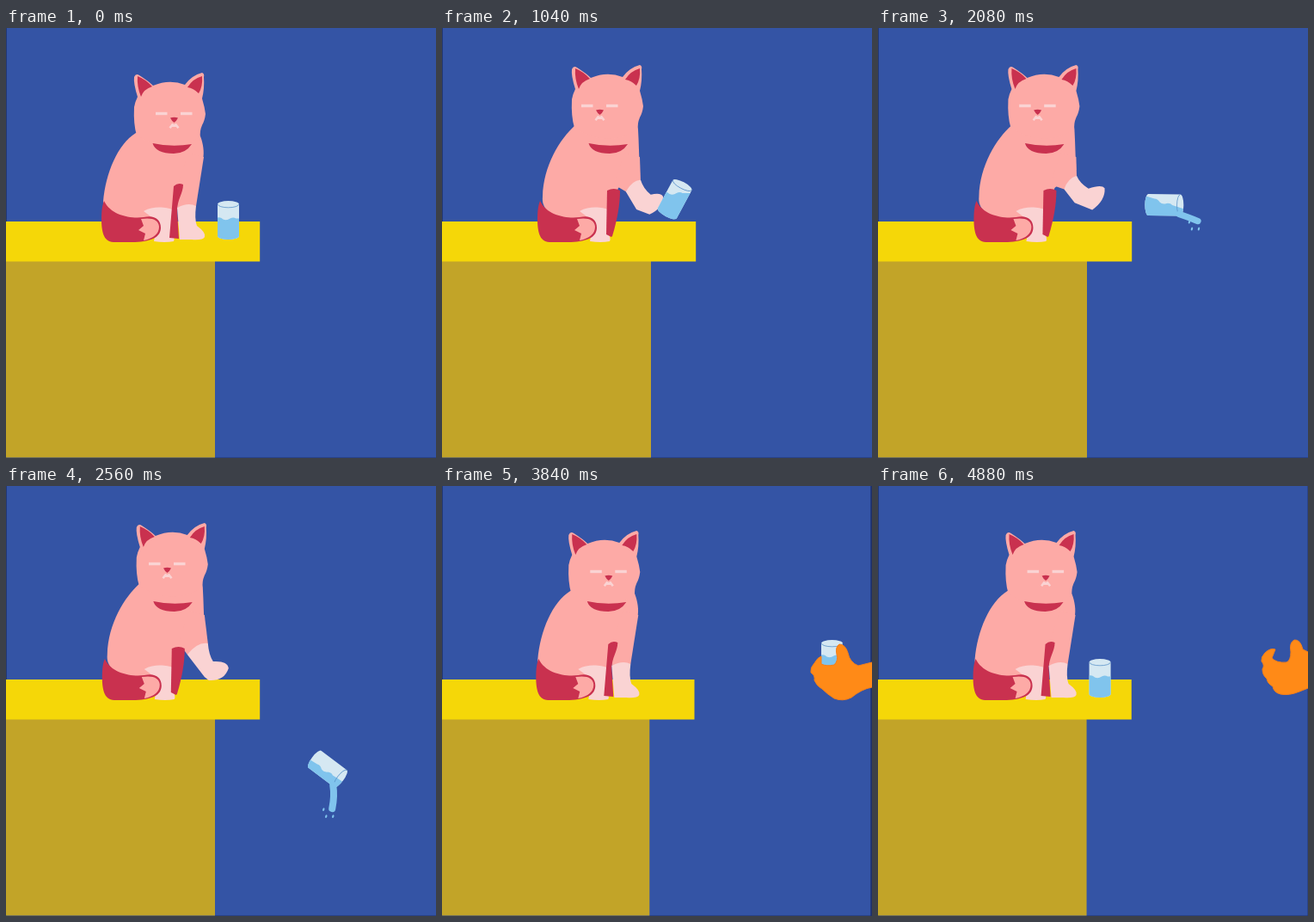
An HTML page with a canvas for the animation above (5040 ms loop, 500 px wide and 500 px high).

```html
<!DOCTYPE html>
<html lang="en">
<head>
<meta charset="utf-8">
<title>Cat and glass</title>
<style>
  html, body { margin: 0; width: 100%; height: 100%; overflow: hidden; background: #1f3068; }
  canvas { display: block; width: 100vw; height: 100vh; }
</style>
</head>
<body>
<canvas id="stage" width="500" height="500"></canvas>
<script>
const ctx = document.getElementById('stage').getContext('2d');
const LOOP = 5040;

// Every bar the picture is held between these moments.
const BAR = 1040;
const BEATS = [0, 80, 240, 480, 640, 720, 880];

const C = {
  dark: '#1f3068', wall: '#3454a5', top: '#f5d708', side: '#c2a428',
  fur: '#fdaaa6', red: '#c9314f', pale: '#fad3d3',
  glass: '#d5e8f2', water: '#80c4ed', rim: '#5b93c9',
  hand: '#ff8a17', handEdge: '#f57f1a'
};

const BODY = [
  'M151 122 C130 135 116 168 113 202 C112 225 160 225 190 225 L205 182 L229 152 C231 145 229 133 226 126Z',
  'M155 113 C137 129 118 160 117 196 C114 225 160 225 191 225 L205 186 L230 165 C229 150 229 135 228 118Z'
];
const INNER_LEG = [
  'M195 184 Q200 179 206 182 C206 192 199 200 199 212 L201 245 L190 244Z',
  'M192 189 Q200 185 207 189 C207 205 204 222 198 242 L197 243 L191 240Z'
];
const HEAD = 'M152 125 Q148 112 149 92 Q150 86 153 80 Q148 64 149 57 Q151 52 155 55 Q166 62 171 67' +
  'Q190 59 208 66 Q216 55 228 52 Q231 53 230 57 Q231 70 228 82 Q231 92 232 100 Q231 108 228 113' +
  'Q225 120 226 127 Q190 150 152 125Z';
const EARS = 'M153 56 Q163 60 170 68 Q160 71 157 80 Q152 68 153 56Z' +
  'M228 56 Q229 68 224 76 Q218 70 211 69 Q217 59 228 56Z';
const COLLAR = 'M170.500 134 Q193 139 216 135 Q209 146 195 146 Q174 146 170.500 134Z';
const HIND = 'M160 213 C172 206 188 209 193 211 L192 238 Q197 243 195 248 Q185 250 172 248 L176 225Z';
const TAIL = 'M114 201 C122 218 145 222 160 220 C172 217 180 222 180 232 C180 243 170 248 150 249' +
  'L125 249 C113 249 111 235 111 222 C111 212 112 206 114 201Z';
const TAIL_TIP = 'M157 222 L160 230 L154 235 L162 239 L160 247 Q178 243 178 231 Q177 219 157 222Z';

const PAW = {
  rest: 'M199 209 Q212 202 221 207 Q219 222 222 230 Q233 238 231 243 Q229 247 216 246 L202 246Z',
  touch: 'M210 195 Q222 181 232 184 Q234 197 240 205 Q250 206 249 213 Q246 226 230 226 L224 224Z',
  lift: 'M217 186 Q220 174 230 170 Q234 178 245 184 Q260 178 264 182 Q266 196 251 209 L228 200Z',
  lower: 'M210 196 Q222 181 234 183 Q235 196 240 204 Q257 203 258 212 Q253 227 235 226 L230 222Z',
  back: 'M206 199 Q218 191 229 195 Q227 207 230 217 Q240 225 240 231 Q238 240 223 238 L203 235Z'
};

const GRIP = 'M500 205 L484 209 Q474 205 472 194 Q469 184 462 184 Q457 187 459 196 Q461 203 456 208' +
  'Q447 210 441 207 L441 198 Q437 199 433 206 Q428 211 429 217 Q434 220 433 226 Q436 233 442 236' +
  'Q448 242 456 247 Q466 251 476 246 Q488 236 500 234 L720 170 L720 113Z';
const OPEN = 'M500 193 L494 190 Q491 178 484 179 Q478 182 480 193 Q480 203 475 205 Q463 206 458 200' +
  'L462 190 Q456 188 450 194 Q445 199 446 204 Q450 208 447 213 Q447 220 452 224 Q453 230 459 233' +
  'Q460 240 468 242 Q478 244 490 239 L500 235 L740 170 L740 105 L507 203Z';
const GLASS = 'M-12.500 -18.500 A12.500 4 0 0 1 12.500 -18.500 L12.500 18.500 A12.500 4 0 0 1 -12.500 18.500Z';

const ramp = (t, from, to) => Math.min(1, Math.max(0, (t - from) / (to - from)));
const smooth = k => k * k * (3 - 2 * k);
const lerp = (a, b, k) => a + (b - a) * k;
const rad = deg => deg * Math.PI / 180;
const numbers = d => d.match(/-?[\d.]+/g).map(Number);

function mix(a, b, k) {
  const to = numbers(b);
  let i = 0;
  return a.replace(/-?[\d.]+/g, v => lerp(+v, to[i++], k).toFixed(3));
}

// Progress of each phase of the story, 0 to 1.
function phases(t) {
  return {
    t,
    reach: ramp(t, 80, 480),
    push: ramp(t, 480, 1520),
    fling: ramp(t, 1520, 2560),
    lower: ramp(t, 2000, 2560),
    fall: ramp(t, 2560, 3360),
    settle: ramp(t, 3360, 3840),
    bring: ramp(t, 3840, 4160),
    leave: ramp(t, 4240, 4880),
    drift: ramp(t, 3840, LOOP)
  };
}

function fill(d, color) {
  ctx.fillStyle = color;
  ctx.fill(new Path2D(d));
}

function box(x, y, w, h, color) {
  ctx.fillStyle = color;
  ctx.fillRect(x, y, w, h);
}

function group(x, y, draw) {
  ctx.save();
  ctx.translate(x, y);
  draw();
  ctx.restore();
}

function drawFace(x, y) {
  group(x, y, () => {
    box(0, -1.7, 13.5, 3.4, C.pale);
    box(29, -1.7, 13.5, 3.4, C.pale);
    fill('M17 5 Q21.500 3.500 26 5 Q24 9 21.500 10.500 Q19 9 17 5Z', C.red);
    ctx.strokeStyle = C.pale;
    ctx.lineWidth = 2.6;
    ctx.stroke(new Path2D('M16.500 16.800 L19.500 13 L21.500 14 L23.500 13 L26.500 16.800'));
  });
}

function drawCat(p) {
  const lean = p.reach - p.settle;
  const paw = [[PAW.touch, p.reach], [PAW.lift, p.push], [PAW.lower, p.lower],
    [PAW.back, p.fall], [PAW.rest, p.settle]].reduce((d, [next, k]) => mix(d, next, k), PAW.rest);
  const [lx, ly, , , rx, ry] = numbers(paw);

  fill(mix(...BODY, lean), C.fur);
  fill(`M200 182 L212 145 L230 150 L${rx} ${ry} L${lx} ${ly}Z`, C.fur);
  fill(HIND, C.pale);
  fill(mix(...INNER_LEG, lean), C.red);
  fill(TAIL, C.red);
  fill(TAIL_TIP, C.fur);
  fill(paw, C.pale);
  group(2 * lean, -9 * lean, () => {
    fill(HEAD, C.fur);
    fill(EARS, C.red);
  });
  fill(COLLAR, C.red);
  drawFace(174 - 12 * p.reach + 3.2 * p.fling + 12 * p.fall - 3.2 * p.settle, 99.5 - 9 * lean);
}

function drawSpill(p, x, y) {
  const s = ramp(p.t, 1280, 2560), left = 1 - p.fall ** 2;
  const dx = (22 * Math.sin(Math.PI * s ** 1.5) - 2 * s) * left;
  const dy = 25 * s ** 3 * left;
  const len = Math.hypot(dx, dy);
  if (len < 2) return;
  group(x, y, () => {
    ctx.strokeStyle = ctx.fillStyle = C.water;
    ctx.lineWidth = Math.min(8, 3 + len / 5);
    ctx.lineCap = 'round';
    ctx.beginPath();
    ctx.moveTo(-1, -2);
    ctx.quadraticCurveTo(dx * .5 + 2, dy * .4, dx, dy);
    ctx.stroke();
    if (len < 20) return;
    for (const [ox, oy] of [[-10, 1], [-7, 9], [1, 9]]) {
      ctx.beginPath();
      ctx.ellipse(dx + ox, dy + oy, 1.1, 2, .3, 0, 7);
      ctx.fill();
    }
  });
}

function drawCup(p, x, y, turn) {
  const poured = p.t < 3840;
  const tilt = poured ? 33 * p.fling + 37 * p.fall : 0;
  const level = poured ? -2 - 3 * p.reach - 4 * p.push + 12 * p.fling + 3 * p.fall : -4 + 2 * p.bring;
  group(x, y, () => {
    ctx.rotate(turn);
    fill(GLASS, C.glass);
    ctx.save();
    ctx.clip(new Path2D(GLASS));
    ctx.rotate(rad(tilt) - turn);
    ctx.translate(0, level);
    fill('M-50 0 L-13 -1 Q-9 -2 -6 1 Q-2 3 2 0 Q6 -2 9 0 L13 0 L50 0 L50 60 L-50 60Z', C.water);
    ctx.restore();
    ctx.strokeStyle = C.rim;
    ctx.lineWidth = .8;
    ctx.beginPath();
    ctx.ellipse(0, -18.5, 12.2, 3.8, 0, 0, Math.PI);
    ctx.stroke();
  });
  if (!poured) return;
  const c = Math.cos(turn), s = Math.sin(turn);
  drawSpill(p, x + 12.5 * c + 18.5 * s, y + 12.5 * s - 18.5 * c);
}

function drawHand(d, x, y) {
  group(x, y, () => {
    fill(d, C.hand);
    ctx.strokeStyle = C.handEdge;
    ctx.lineWidth = 1;
    ctx.stroke(new Path2D(d));
  });
}

function drawRoom(p, dx) {
  const bump = p.fall - p.settle;
  const left = .8 - bump;
  box(0, 0, 500, 500, C.dark);
  box(left, 0, 500 + Math.min(dx, 0) - left, 499.5, C.wall);
  group(dx, bump, () => {
    box(-5 * p.settle, 270, 243 + 5 * p.settle, 229.5, C.side);
    box(-5, 225, 300.2, 46.5, C.top);
    group(.8 * p.fling + 1.5 * p.fall - 2.3 * p.settle, 0, () => drawCat(p));
  });
}

function draw(t) {
  const p = phases(t);
  const dx = p.fall - 2.7 * p.settle + 1.7 * p.drift ** 2;
  drawRoom(p, dx);

  if (t < 3600) {
    const x = 258.5 + 22.5 * p.push + 93 * smooth(p.fling) + 19 * p.fall;
    const y = 223.5 - 5.5 * p.reach - 35 * p.push + 146 * p.fling ** 3 + 149 * p.fall;
    drawCup(p, x, y, rad(5 * p.reach + 43 * p.push + 79 * p.fling + 43 * p.fall));
  } else if (t >= 3840) {
    const x = lerp(453.5, 258.5 + dx, p.bring), y = lerp(201.5, 223.5, p.bring);
    drawCup(p, x, y, 0);
    const away = (1 - p.leave) ** 2;
    if (t < 4240) drawHand(GRIP, x - 453.5, y - 201.5);
    else drawHand(OPEN, -204 * away, 22 * away);
  }
}

function hold(t) {
  const beat = t % BAR;
  return t - beat + BEATS.findLast(b => b <= beat);
}

const start = performance.now();
let shown = -1;
function tick() {
  const held = hold((performance.now() - start) % LOOP);
  if (held !== shown) draw(shown = held);
  requestAnimationFrame(tick);
}
tick();
</script>
</body>
</html>
```
